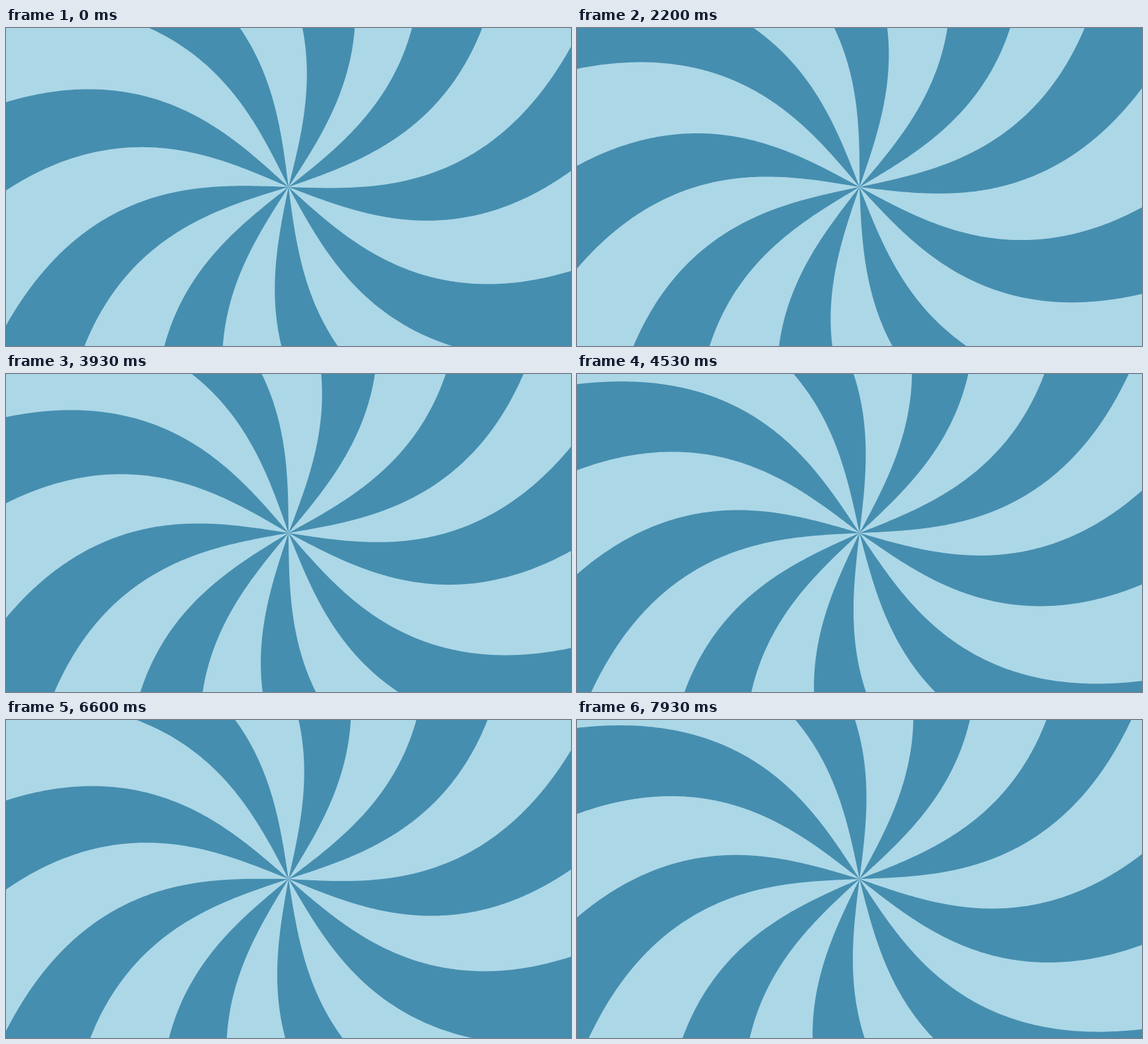
These frames come from a looping animation (854 by 480 pixels, 8000 ms). An HTML page with a canvas:

```html
<!DOCTYPE html>
<html lang="en">
<head>
<meta charset="utf-8">
<title>Swirl</title>
<style>
  html, body { margin: 0; width: 100%; height: 100%; overflow: hidden; background: #abd7e7; }
  canvas { display: block; }
</style>
</head>
<body>
<canvas id="stage" width="854" height="480"></canvas>
<script>
const LIGHT = '#abd7e7', DARK = '#468eaf';
const ARMS = 9, FIRST = 51.7, PITCH = 40.3, ARM_WIDTH = 19; // degrees clockwise from up
const LOOP = 8000, FPS = 15, STEP_ANGLE = 0.8;
const REACH = 560;
const rad = deg => deg * Math.PI / 180;

// Backward twist of an edge at radius r, easing in from the centre.
const twist = r => rad(21.89) * (1 - Math.cos(Math.PI * r / 800));

function edgePoint(path, angle, r) {
  const a = angle - twist(r);
  path.lineTo(r * Math.sin(a), -r * Math.cos(a));
}

// The pitch leaves one light gap narrower than the others.
const arms = new Path2D();
for (let k = 0; k < ARMS; k++) {
  const start = rad(FIRST + PITCH * k), end = start + rad(ARM_WIDTH);
  arms.moveTo(0, 0);
  for (let r = 4; r <= REACH; r += 4) edgePoint(arms, start, r);
  for (let r = REACH; r > 0; r -= 4) edgePoint(arms, end, r);
  arms.closePath();
}

const ctx = document.getElementById('stage').getContext('2d');

function draw(time) {
  const step = Math.floor((time % LOOP) * FPS / 1000 + 0.1);
  ctx.setTransform(1, 0, 0, 1, 0, 0);
  ctx.fillStyle = LIGHT;
  ctx.fillRect(0, 0, 854, 480);
  ctx.translate(427, 240);
  ctx.rotate(rad(step * STEP_ANGLE));
  ctx.fillStyle = DARK;
  ctx.fill(arms);
}

const startTime = performance.now();
function tick() {
  draw(performance.now() - startTime);
  requestAnimationFrame(tick);
}
tick();
</script>
</body>
</html>
```
